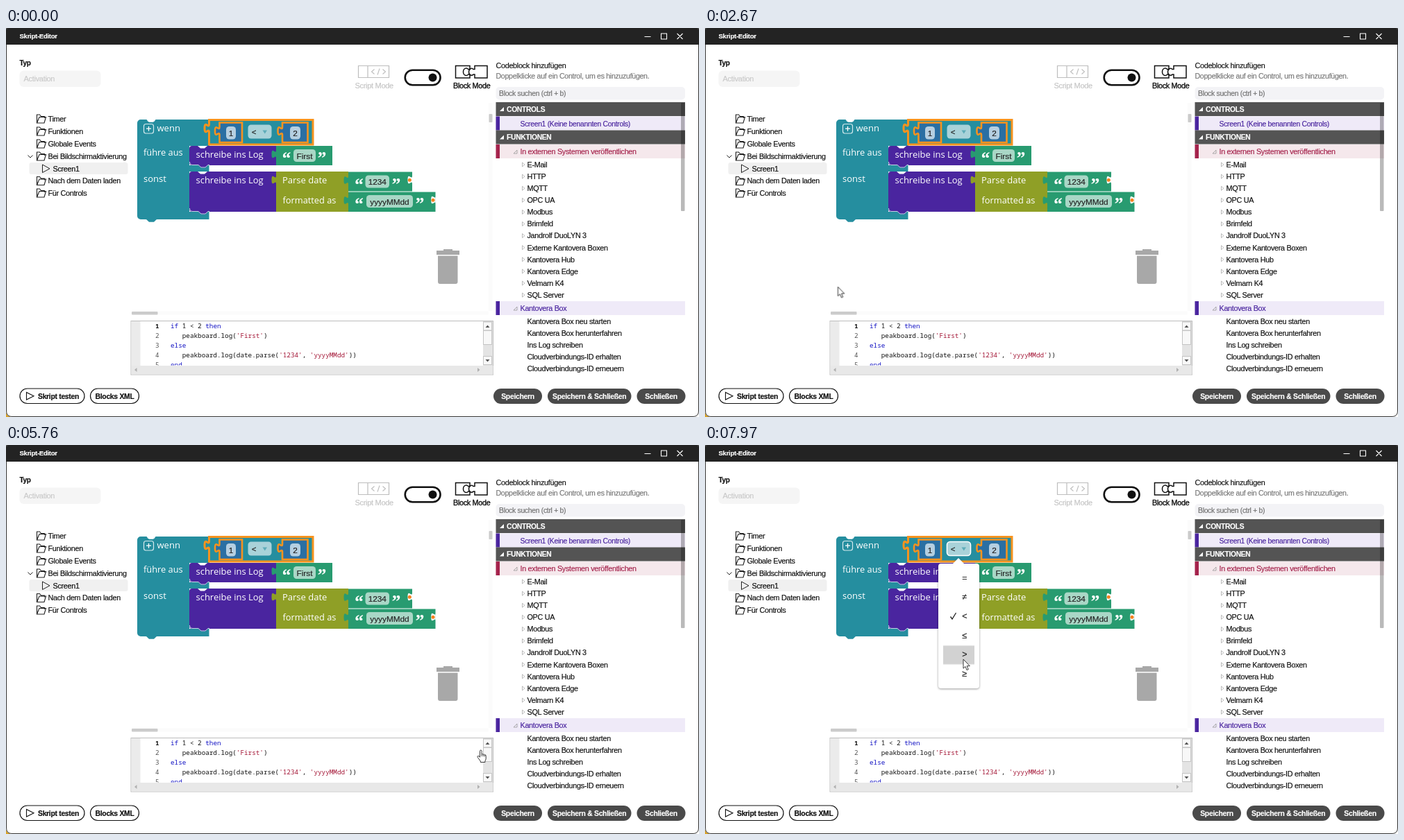
An HTML page that plays this animation: 998 px wide and 561 px high, repeating every 8 s.

```html
<!DOCTYPE html>
<html lang="de">
<head>
<meta charset="utf-8">
<title>Skript-Editor</title>
<style>
html, body { margin: 0; width: 100%; height: 100%; overflow: hidden; background: #fff; }
svg { display: block; width: 100vw; height: 100vh; }
text { font-family: "Liberation Sans", Arial, sans-serif; letter-spacing: -.3px; white-space: pre; stroke-width: .18; }
.b { font-weight: 700; }
.block { font-family: "Open Sans", "Noto Sans", sans-serif; letter-spacing: 0; fill: #fff; stroke: none; }
.field { letter-spacing: 0; fill: #222; }
.quote { font-family: "Liberation Serif", serif; font-weight: 700; letter-spacing: 0; fill: #fff; }
.code { font-family: "Noto Sans Mono", "DejaVu Sans Mono", monospace; letter-spacing: 0; stroke: none; }
.kw { fill: #1414c4; }
.str { fill: #a31535; }
.anim { animation: 8s linear infinite; }

#pointer { animation-name: move; }
@keyframes move {
  0%, 6.7% { transform: translate(212px, 565px); animation-timing-function: ease-in-out; }
  15.5% { transform: translate(356px, 142px); }
  17.375% { transform: translate(362px, 144px); }
  19.375%, 29% { transform: translate(364px, 150px); animation-timing-function: ease-in-out; }
  37% { transform: translate(68px, 533px); }
  39%, 41.4% { transform: translate(52px, 528px); animation-timing-function: ease-in-out; }
  49.75% { transform: translate(311px, 227px); }
  51%, 54.2% { transform: translate(310px, 203px); animation-timing-function: ease-in-out; }
  57.5% { transform: translate(363px, 205px); }
  59.375% { transform: translate(388.5px, 235px); animation-timing-function: ease-in-out; }
  65.25%, 67.5% { transform: translate(684px, 424px); }
  70.125%, 72.4% { transform: translate(684px, 440px); animation-timing-function: ease-in-out; }
  81.625% { transform: translate(371px, 152px); }
  82.5%, 92.2% { transform: translate(372.5px, 155.5px); animation-timing-function: ease-in-out; }
  97.5%, 100% { transform: translate(372px, 309px); }
}
#hand { animation-name: hand; animation-timing-function: step-end; }
@keyframes hand {
  0% { opacity: 0; } 37.2% { opacity: 1; } 42.5% { opacity: 0; }
  68.125% { opacity: 1; } 73.2%, 100% { opacity: 0; }
}
#arrow { animation-name: arrow; animation-timing-function: step-end; }
@keyframes arrow {
  0% { opacity: 1; } 37.2% { opacity: 0; } 42.5% { opacity: 1; }
  68.125% { opacity: 0; } 73.2%, 100% { opacity: 1; }
}
#menu { animation-name: menu; }
@keyframes menu {
  0%, 18.9% { opacity: 0; } 20.625%, 23.8% { opacity: 1; } 26.1%, 85% { opacity: 0; }
  87.75% { opacity: .85; } 88.6%, 100% { opacity: 1; }
}
#row { animation-name: row; animation-timing-function: step-end; }
@keyframes row {
  0% { opacity: 0; transform: translateY(0); }
  93.85% { opacity: 1; transform: translateY(0); }
  94.5% { opacity: 1; transform: translateY(27.7px); }
  95% { opacity: 1; transform: translateY(55.4px); }
  95.6% { opacity: 1; transform: translateY(83.1px); }
  96.25%, 100% { opacity: 1; transform: translateY(110.8px); }
}
#focus { animation-name: focus; animation-timing-function: step-end; }
@keyframes focus {
  0% { opacity: 0; } 15.5% { opacity: 1; } 30% { opacity: 0; } 82.5%, 100% { opacity: 1; }
}
#dialog { animation-name: dialog; animation-timing-function: step-end; }
@keyframes dialog {
  0% { visibility: hidden; } 40% { visibility: visible; } 72%, 100% { visibility: hidden; }
}
#test { animation-name: test; animation-timing-function: step-end; }
@keyframes test {
  0% { color: #111; } 37.2% { color: #f7941d; } 42.5%, 100% { color: #111; }
}
#ok { animation-name: ok; animation-timing-function: step-end; }
@keyframes ok {
  0% { fill: #4a4a4a; } 68.125% { fill: #f7941d; } 72%, 100% { fill: #4a4a4a; }
}
</style>
</head>
<body>
<svg id="stage" viewBox="0 0 998 561"></svg>
<script>
const TEAL = '#258e9f', BLUE = '#2a6fa3', PURPLE = '#4a259f', GREEN = '#289b70',
      OLIVE = '#8f9f26', ORANGE = '#f7931e', DARK = '#4a4a4a';

const esc = s => s.replace(/&/g, '&amp;').replace(/</g, '&lt;');
const text = (x, y, s, size = 10.8, fill = '#111', cls = '', more = '') =>
  `<text x="${x}" y="${y}" font-size="${size}" fill="${fill}" stroke="${fill}" class="${cls}" ${more}>${esc(s)}</text>`;
const mid = (x, y, s, size, fill, cls) => text(x, y, s, size, fill, cls, 'text-anchor="middle"');
const rect = (x, y, w, h, fill, r = 0, more = '') =>
  `<rect x="${x}" y="${y}" width="${w}" height="${h}" fill="${fill}" rx="${r}" ${more}/>`;
const path = (d, fill, more = '') => `<path d="${d}" fill="${fill}" ${more}/>`;
const line = (d, stroke = '#222', w = 1) => path(d, 'none', `stroke="${stroke}" stroke-width="${w}"`);

// Value block with a puzzle tab on its left side
const valueBlock = (x, y, w, h, fill, more) =>
  path(`M${x} ${y}h${w}v${h}h${-w}V${y + 18}c0-8-6.5 6.4-6.5-6s6.5 2 6.5-6Z`, fill, more);
const outline = w => `stroke="${ORANGE}" stroke-width="${w}"`;
const statement = (y, h) =>
  path(`M264 ${y + 4}q0-4 4-4h8l4 3.500h6l4-3.500H389v${h}H291l-4 3.500h-6l-4-3.500h-9q-4 0-4-4Z`, PURPLE) +
  line(`M264.500 ${y + h - 5}q0 4.500 4.500 4.500h8l4 3.500h6l4-3.500h2`, '#d3e6ec', .9) +
  text(273.5, y + 16.8, 'schreibe ins Log', 13, '#fff', 'block');
const field = (x, y, w, h, s, fill) =>
  rect(x, y, w, h, fill, 4.5) + mid(x + w / 2, y + h / 2 + 4.5, s, 11.8, '#222', 'field');
const quotes = (x1, x2, y) => mid(x1, y, '“', 25, '#fff', 'quote') + mid(x2, y, '”', 25, '#fff', 'quote');
const windowButtons = (x1, x2, x3, y) =>
  line(`M${x1 - 4.5} ${y + .5}h9M${x2 - 4} ${y - 4}h8v8h-8ZM${x3 - 4} ${y - 4}l8 8m0-8l-8 8`, '#fff', 1.1);
const pill = (x, y, w, s, fill = DARK, id = '') =>
  rect(x, y, w, 22, fill, 11, id) + mid(x + w / 2, y + 14.8, s, 10.4, '#fff', 'b');

function frameAndHeader() {
  return rect(0, 0, 998, 561, '#fff') +
    path('M0 554q1 6 8 7H0Z', '#d9a227') +
    path('M.5 552V.5H997.500V552q0 8.500-8.500 8.500H9q-8.500 0-8.500-8.500Z', '#fff', 'stroke="#333"') +
    path('M0 24V5q0-5 5-5H993q5 0 5 5V24Z', '#232323') +
    text(19.5, 15.3, 'Skript-Editor', 9.6, '#fff', 'b') + windowButtons(924, 947.5, 970.5, 12) +
    text(19.5, 53.8, 'Typ', 10, '#111', 'b') + rect(19.5, 61.5, 117, 23.5, '#f5f5f5', 6) +
    text(25.5, 77, 'Activation', 11, '#c9c9c9') +
    line('M507.500 54.500h44v17h-44ZM521 54.500v17', '#bdbdbd', 1.2) +
    line('M530.500 59.500l-4 3.500l4 3.500M542.500 59.500l4 3.500l-4 3.500M538 58.500l-3 9', '#bdbdbd', 1.1) +
    text(502.5, 86.7, 'Script Mode', 11, '#c4c4c4') +
    rect(574.7, 60.7, 50.8, 21.6, '#fff', 10.8, 'stroke="#111" stroke-width="2.6"') +
    '<circle cx="614.500" cy="71.500" r="6" fill="#111"/>' +
    line('M668 59.500V54.500H647.500V72H668V67h-2.500q-1 2-3.500 1.500q-3.500-1-3.500-5.200t3.500-5.200q2.500-.5 3.500 1.400Z', '#111', 1.5) +
    line('M675 59.500V54.500H693V72H675V67h-2q-1.500 2-4 1q-2.500-1.500-2.500-4.700t2.500-4.700q2.500-1 4 .9Z', '#111', 1.5) +
    text(644, 86.7, 'Block Mode', 10.8, '#111', '', 'style="stroke-width:.35"');
}

function tree() {
  const rows = [[131, 'Timer'], [149, 'Funktionen'], [167, 'Globale Events'],
    [185, 'Bei Bildschirmaktivierung'], [220.5, 'Nach dem Daten laden'], [238, 'Für Controls']];
  const folder = y => line(`M44.500 ${y + 6}V${y - 6}h4l2 2.500h5v2.500M44.500 ${y + 6}l3.500-8.500h9.500l-2.500 8.500Z`, '#222', 1.15);
  return rect(33.5, 194, 142, 17, '#f0f0f0', 3) + line('M31.500 183.500l3.500 3.500l3.500-3.500') +
    line('M52.500 197v11.500l10.500-5.700Z') + text(67.5, 206.8, 'Screen1') +
    rows.map(([y, s]) => folder(y) + text(60.5, y + 3.9, s)).join('');
}

function blocks() {
  return path('M189 137a5 5 0 0 1 5-5h8.500q2 3.700 4 3.700h5q2 0 4-3.700H293V170H264V198H292.500V207H264V265H292.500V276H217l-4 3.700h-7l-4-3.700H194a5 5 0 0 1-5-5Z', TEAL) +
    rect(198.500, 138.500, 14, 13.500, 'none', 3, 'stroke="#d5eaee" stroke-width="1.2"') +
    line('M202 145.200h7M205.500 141.700v7', '#fff', 1.3) +
    text(217.5, 149, 'wenn', 13, '#fff', 'block') + text(198, 184, 'führe aus', 12.8, '#fff', 'block') +
    text(198, 222, 'sonst', 13, '#fff', 'block') +
    valueBlock(292.5, 132.5, 149.5, 35.5, TEAL, outline(3)) +
    valueBlock(307.5, 136.5, 32.5, 28.5, BLUE, outline(2.6)) +
    valueBlock(398, 136.5, 36.5, 28.5, BLUE, outline(2.6)) +
    field(317, 142, 14, 18.5, '1', '#b5cfe1') + field(409, 142, 15, 18.5, '2', '#b5cfe1') +
    rect(348.5, 139.5, 34, 20, '#a9d2d9', 4.5) +
    rect(348.5, 139.5, 34, 20, 'none', 4.5, 'id="focus" class="anim" stroke="#fff" stroke-width="1.6"') +
    mid(357, 153.6, '<', 11.5, '#222', 'field') + path('M369.500 147.500h6.500l-3.200 5Z', '#5eacb9') +
    statement(170, 28) + statement(207, 58) +
    valueBlock(389, 170, 81, 28, GREEN) + quotes(404, 455, 195.5) + field(414, 175, 32, 18, 'First', '#a9d7c6') +
    valueBlock(389, 207, 104, 58, OLIVE) +
    text(398, 224.3, 'Parse date', 13, '#fff', 'block') + text(398.5, 253, 'formatted as', 12.8, '#fff', 'block') +
    valueBlock(493, 207.5, 92, 28, GREEN) + quotes(508.5, 562, 233.5) + field(517.5, 212.5, 34.5, 18, '1234', '#a9d7c6') +
    valueBlock(493, 236.5, 125.5, 28.5, GREEN) + quotes(508.5, 596, 262) + field(519, 241, 67, 18, 'yyyyMMdd', '#a9d7c6') +
    [[585, 213], [618.7, 242]].map(([x, y]) =>
      path(`M${x} ${y}c0 8-6.500-6.400-6.500 6s6.500-2 6.500 6Z`, '#fff') +
      `<circle cx="${x - 3.7}" cy="${y + 6.2}" r="2.500" fill="#f58220"/>`).join('') +
    path('M630 319h13v2h10v6h-33v-6h10Z', '#a8a8a8') + path('M622 328.500h28.500V366q0 3-3 3h-22.500q-3 0-3-3Z', '#a8a8a8') +
    rect(695, 108, 5.5, 300, '#fbfbfb') + rect(695.5, 124, 5, 12, '#cbcbcb', 1) +
    rect(181, 408.5, 514, 5, '#fbfbfb') + rect(181, 409, 37.5, 4.5, '#cbcbcb', 1);
}

function codeBox() {
  const kw = s => `<tspan class="kw">${s}</tspan>`, str = s => `<tspan class="str">${s}</tspan>`;
  const lines = [
    kw('if') + ' 1 &lt; 2 ' + kw('then'),
    `   peakboard.log(${str("'First'")})`,
    kw('else'),
    `   peakboard.log(date.parse(${str("'1234'")}, ${str("'yyyyMMdd'")}))`,
    kw('end')];
  const scrollPart = (y, h) => rect(687.5, y, 12, h, '#f8f8f8', 0, 'stroke="#c4c4c4"');
  return rect(180, 422.5, 521.5, 77.5, '#fff', 0, 'stroke="#bdbdbd"') + rect(180.5, 423, 13, 64, '#ebebeb') +
    '<clipPath id="code"><path d="M181 423h506v63.500H181Z"/></clipPath><g clip-path="url(#code)">' +
    lines.map((s, i) => {
      const y = 433 + 14 * i;
      return text(215, y, `${i + 1}`, 9.3, i ? '#555' : '#111', i ? 'code' : 'code b') +
        `<text class="code" x="237" y="${y}" font-size="9.300" fill="#111">${s}</text>`;
    }).join('') + '</g>' +
    rect(687, 423, 14, 64, '#e4e4e4') + rect(180.5, 487, 521, 12.5, '#e8e8e8') +
    scrollPart(424, 12) + scrollPart(436.5, 20) + scrollPart(473.5, 12) +
    path('M690.500 432h6l-3-3.500ZM690.500 478h6l-3 3.500Z', '#555') +
    path('M188.500 490v6l-3.500-3ZM679 490v6l3.500-3Z', '#b0b0b0');
}

function sidePanel() {
  const systems = ['E-Mail', 'HTTP', 'MQTT', 'OPC UA', 'Modbus', 'Brimfeld', 'Jandrolf DuoLYN 3',
    'Externe Kantovera Boxen', 'Kantovera Hub', 'Kantovera Edge', 'Velmarn K4', 'SQL Server'];
  const actions = ['Kantovera Box neu starten', 'Kantovera Box herunterfahren', 'Ins Log schreiben',
    'Cloudverbindungs-ID erhalten', 'Cloudverbindungs-ID erneuern'];
  const header = (y, s) => rect(705.5, y, 272.5, 20, '#545454') +
    path(`M717 ${y + 7}v6h-6Z`, '#fff') + text(721, y + 13.8, s, 10.3, '#fff', 'b');
  const row = (y, s, fill, color, size, arrow = true) => rect(705.5, y, 272.5, 20, fill) +
    rect(705.5, y, 5.5, 20, color) + text(740.5, y + 14, s, size, color) +
    (arrow ? line(`M736 ${y + 8}v5h-5Z`, '#999', .8) : '');
  return text(705.5, 57.6, 'Codeblock hinzufügen') +
    text(705.5, 72.8, 'Doppelklicke auf ein Control, um es hinzuzufügen.', 10.6, '#777') +
    rect(705.5, 85, 272.5, 18.5, '#f3f3f6', 5) + text(710, 98.3, 'Block suchen (ctrl + b)', 10.4, '#707070') +
    header(107, 'CONTROLS') + row(127.5, 'Screen1 (Keine benannten Controls)', '#efeaf8', PURPLE, 10.4, false) +
    header(147.5, 'FUNKTIONEN') + row(168, 'In externen Systemen veröffentlichen', '#f5e8ec', '#a5234c') +
    systems.map((s, i) => {
      const y = 197 + 17.1 * i;
      return line(`M743.500 ${y - 3}v6l3.500-3Z`, '#aaa', .8) + text(750.5, y + 3.8, s);
    }).join('') +
    row(394, 'Kantovera Box', '#efeaf8', PURPLE) +
    actions.map((s, i) => text(750.5, 426.6 + 17.1 * i, s)).join('') +
    rect(972, 108, 5.5, 156, '#000', 1, 'opacity=".27"');
}

function footer() {
  return '<g id="test" class="anim">' +
    rect(20, 520, 93, 21.5, '#fff', 10.7, 'stroke="currentColor" stroke-width="1.2"') +
    line('M29.500 525.500v10.500l10.500-5.200Z', 'currentColor', 1.1) +
    text(46, 534.7, 'Skript testen', 10.4, 'currentColor', 'b') + '</g>' +
    rect(121.5, 520, 70, 21.5, '#fff', 10.7, 'stroke="#111" stroke-width="1.2"') +
    mid(156.5, 534.7, 'Blocks XML', 10.4, '#111', 'b') +
    pill(702, 520, 70, 'Speichern') + pill(780, 520, 120.5, 'Speichern & Schließen') + pill(908.5, 520, 70, 'Schließen');
}

function menu() {
  return '<g id="menu" class="anim">' +
    path('M340 171H357l8-8l8 8H391q4 0 4 4V347q0 4-4 4H340q-4 0-4-4V175q0-4 4-4Z', '#fff',
      'style="filter:drop-shadow(0 1px 1.500px #0006)"') +
    rect(343, 178.5, 45, 27, '#d2d2d2', 0, 'id="row" class="anim"') +
    line('M353.500 247.500l2.500 3.500l5.500-9', '#222', 1.3) +
    ['=', '≠', '<', '≤', '>', '≥'].map((s, i) => mid(374, 195.8 + 27.6 * i, s, 12.5, '#222', 'field')).join('') + '</g>';
}

function dialog() {
  return '<g id="dialog" class="anim">' + rect(249.5, 93.5, 499, 373.5, '#fff', 9, 'stroke="#333"') +
    path('M249 118V103q0-10 10-10H739q10 0 10 10V118Z', '#232323') +
    text(268.5, 108.7, 'Skript-Tester', 9.6, '#fff', 'b') + windowButtons(674.5, 698, 721.5, 105) +
    text(269, 150.5, 'Keine Probleme gefunden', 13.1, '#111', 'b') + text(269, 192.5, 'Output', 13.1, '#111', 'b') +
    text(269, 214.3, 'Line 2', 9.3, '#111', 'code') + text(323.5, 215.8, 'First', 9.3, '#111', 'code') +
    pill(659, 426, 70, 'OK', DARK, 'id="ok" class="anim"') + '</g>';
}

function pointer() {
  const ink = 'stroke="#222" stroke-width=".9" stroke-linejoin="round"';
  return '<g id="pointer" class="anim"><g id="arrow" class="anim">' +
    path('M0 0V13.200L3 10.500L5 15.500L7.300 14.600L5.200 9.700H9.300Z', '#fff', ink) + '</g><g id="hand" class="anim">' +
    path('M-1.500 1.700q0-1.700 1.300-1.700t1.300 1.700V6q1.200-.9 2.200.4q1.200-.8 2.100.4q1.800-.4 1.800 1.700v3.500q0 2-1.300 3.500v2h-6.600v-1.500l-4-5.500q-.9-1.700.4-2t2.800 1.700Z', '#fff', ink) +
    line('M1.100 6v3M3.300 6.500v2.700M5.400 7v2.400', '#222', .8) + '</g></g>';
}

document.getElementById('stage').innerHTML =
  frameAndHeader() + tree() + blocks() + codeBox() + sidePanel() + footer() + menu() + dialog() + pointer();
</script>
</body>
</html>
```
